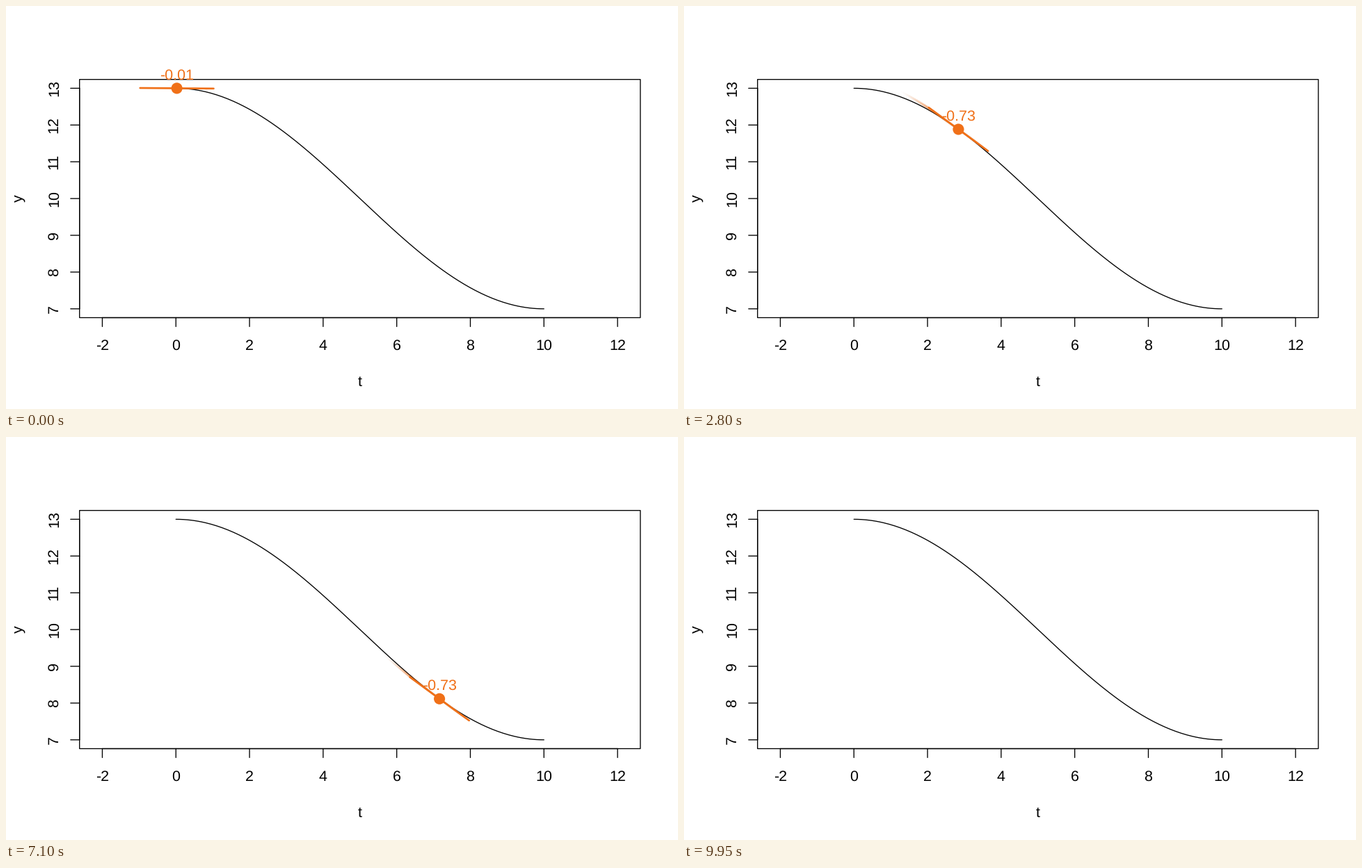
A matplotlib script that plays this animation: 966x580 px, repeating every 10000 ms.

```python
import numpy as np
import matplotlib.pyplot as plt
from matplotlib.animation import FuncAnimation
from matplotlib.collections import LineCollection
from matplotlib.colors import to_rgba
from matplotlib.patches import Circle, Rectangle

W, H, DPI = 966, 580, 100
FRAMES, INTERVAL = 200, 50
LINE = 25.78                  # height of one margin line in pixels
FONT_PX = LINE / 1.2
THIN = 1.34
LEFT, TOP = 4.1 * LINE, 4.1 * LINE
RIGHT, BOTTOM = W - 2.1 * LINE, H - 5.1 * LINE
MID_X, MID_Y = (LEFT + RIGHT) / 2, (TOP + BOTTOM) / 2
SCALE = (BOTTOM - TOP) / 6.48
ORANGE = "#f07018"
WAKE = 15

plt.rcParams.update({
    "font.family": "Liberation Sans",
    "font.size": FONT_PX * 72 / DPI,
    "text.hinting": "none",
    "path.snap": False,
    "axes.unicode_minus": False,
})


def px(t):
    return MID_X + (t - 5) * SCALE


def py(y):
    return MID_Y - (y - 10) * SCALE


def pt(width):
    return width * 72 / DPI


def height(t):
    return 10 + 3 * np.cos(np.pi * t / 10)


def slope(t):
    return -0.3 * np.pi * np.sin(np.pi * t / 10)


def time_at(i):
    return (i + 0.5) * 10 / (FRAMES - 1)


def segment(t, s):
    """Line of half length 1 through the curve at t, in pixels."""
    d = 1 / np.hypot(1, s)
    y = height(t)
    return [(px(t - d), py(y - s * d)), (px(t + d), py(y + s * d))]


fig = plt.figure(figsize=(W / DPI, H / DPI), dpi=DPI, facecolor="white")
ax = fig.add_axes([0, 0, 1, 1])
ax.set_xlim(0, W)
ax.set_ylim(H, 0)
ax.axis("off")


def stroke(x, y):
    ax.plot(x, y, color="black", lw=pt(THIN), solid_capstyle="round", zorder=1)


def label(x, y, text, angle=0, **style):
    return ax.text(x, y, text, ha="center", va="baseline", rotation=angle,
                   rotation_mode="anchor", **style)


box = Rectangle((LEFT, TOP), RIGHT - LEFT, BOTTOM - TOP, fill=False,
                ec="black", lw=pt(THIN), joinstyle="round", zorder=1)
ax.add_patch(box)
ts = np.linspace(0, 10, 200)
stroke(px(ts), py(height(ts)))

stroke([px(-2), px(12)], [BOTTOM, BOTTOM])
for v in range(-2, 13, 2):
    stroke([px(v)] * 2, [BOTTOM, BOTTOM + LINE / 2])
    label(px(v), BOTTOM + 1.8 * LINE, str(v))
stroke([LEFT, LEFT], [py(7), py(13)])
for v in range(7, 14):
    stroke([LEFT - LINE / 2, LEFT], [py(v)] * 2)
    label(LEFT - 1.2 * LINE, py(v), str(v), 90)
label(MID_X, BOTTOM + 3.8 * LINE, "t")
label(LEFT - 3.2 * LINE, MID_Y, "y", 90)

wake = LineCollection([], linewidths=pt(2 * THIN), capstyle="round", zorder=3)
ax.add_collection(wake, autolim=False)
tangent, = ax.plot([], [], color=ORANGE, lw=pt(2 * THIN),
                   solid_capstyle="round", zorder=4)
dot = Circle((0, 0), 0.375 * FONT_PX, fc=ORANGE, ec="none", zorder=5)
ax.add_patch(dot)
value = label(0, 0, "", color=ORANGE, zorder=6)

clip = Rectangle((LEFT, TOP), RIGHT - LEFT, BOTTOM - TOP,
                 transform=ax.transData)
for part in (wake, tangent, dot):
    part.set_clip_path(clip)
movers = (wake, tangent, dot, value)


def update(i):
    shown = i < FRAMES - 1
    for part in movers:
        part.set_visible(shown)
    if not shown:
        return movers

    t = time_at(i)
    y, s = height(t), slope(t)
    tangent.set_data(*zip(*segment(t, s)))
    dot.center = (px(t), py(y))
    value.set_position((px(t), py(y) - LINE / 2))
    value.set_text(f"{round(s, 2):g}")

    # Fading trail: chords from earlier points towards the current one
    lines, colors = [], []
    for k in range(min(WAKE - 1, i), 0, -1):
        old = time_at(i - k)
        lines.append(segment(old, (y - height(old)) / (t - old)))
        colors.append(to_rgba(ORANGE, 0.12 * (1 - k / WAKE)))
    wake.set_segments(lines)
    wake.set_color(colors)
    return movers


anim = FuncAnimation(fig, update, frames=FRAMES, interval=INTERVAL,
                     repeat=True, repeat_delay=0, blit=False)
plt.show()
```
